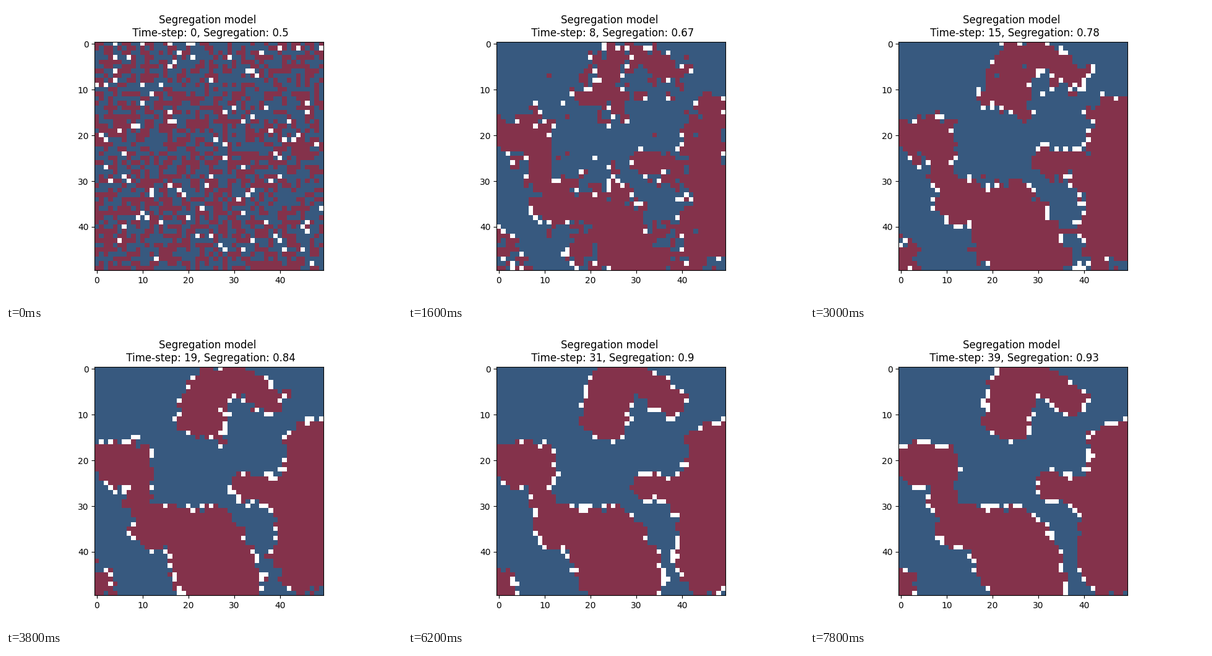
These frames come from a looping animation (640x480 px, 8000 ms). A matplotlib script:

```python
import numpy as np
import matplotlib.pyplot as plt
from matplotlib.animation import FuncAnimation
from matplotlib.colors import ListedColormap

SIZE, STEPS, EMPTY = 50, 40, 98
COLORS = ListedColormap(["#ffffff", "#84324b", "#37597f"])

# Red territory as thick strokes: start, end, radius (in cells).
STROKES = [
    ((25, 4), (24, 11), 5.3),
    ((29, 1), (38, 8), 3.4),
    ((44, 16), (48, 18), 3.2),
    ((48, 18), (47, 30), 6),
    ((47, 30), (47, 42), 8),
    ((33, 26), (45, 28), 3),
    ((4, 21.5), (9, 22), 4.8),
    ((9, 25), (12, 34), 3),
    ((13, 35), (27, 36), 4.8),
    ((25, 40), (27.5, 46), 9),
    ((0, 47), (1, 48), 3),
]


def stroke_depth(start, end, radius):
    """How far each cell lies inside a round-ended stroke."""
    y, x = np.mgrid[:SIZE, :SIZE] + 0.5
    (x0, y0), (x1, y1) = start, end
    dx, dy = x1 - x0, y1 - y0
    t = np.clip(((x - x0) * dx + (y - y0) * dy) / (dx**2 + dy**2), 0, 1)
    return radius - np.hypot(x - x0 - t * dx, y - y0 - t * dy)


def blur(a):
    p = np.pad(a, 1, mode="edge")
    p = (p[:-2] + 2 * p[1:-1] + p[2:]) / 4
    return (p[:, :-2] + 2 * p[:, 1:-1] + p[:, 2:]) / 4


depth = np.max([stroke_depth(*s) for s in STROKES], axis=0)
pull = 1.6 * np.tanh(depth / 4)
grain = np.random.default_rng(7).standard_normal((SIZE, SIZE))
clumps = blur(grain) / blur(grain).std()


def grid(k):
    rng = np.random.default_rng(100 + k)
    mix = 0.7 * min(k / 4, 1)
    flicker = 0.3 * rng.standard_normal((SIZE, SIZE)) if k else 0
    noise = (1 - mix) * grain + mix * clumps + flicker

    # Order wins over noise as the steps go by.
    red = k * pull + 6 * noise > 0
    cells = np.where(red, 1, 2)

    # Vacant cells gather along the borders as the groups separate.
    border = 1 - np.abs(blur(np.where(red, 1.0, -1.0)))
    score = rng.random((SIZE, SIZE)) + k / 12 * np.minimum(border, 0.5)
    cells.flat[np.argsort(score, axis=None)[-EMPTY:]] = 0
    return cells


def segregation(k):
    level = np.interp(k, [0, 4, 12, 19, 26, 31, 39],
                      [0.5, 0.6, 0.74, 0.84, 0.88, 0.9, 0.93])
    return round(float(level), 2)


fig, ax = plt.subplots(figsize=(6.4, 4.8), dpi=100)
image = ax.imshow(grid(0), cmap=COLORS, vmin=0, vmax=2)


def update(k):
    image.set_data(grid(k))
    ax.set_title(f"Segregation model \n Time-step: {k}, "
                 f"Segregation: {segregation(k)}")
    return [image]


anim = FuncAnimation(fig, update, frames=STEPS, interval=200,
                     repeat=True, repeat_delay=0, blit=False)
plt.show()
```
